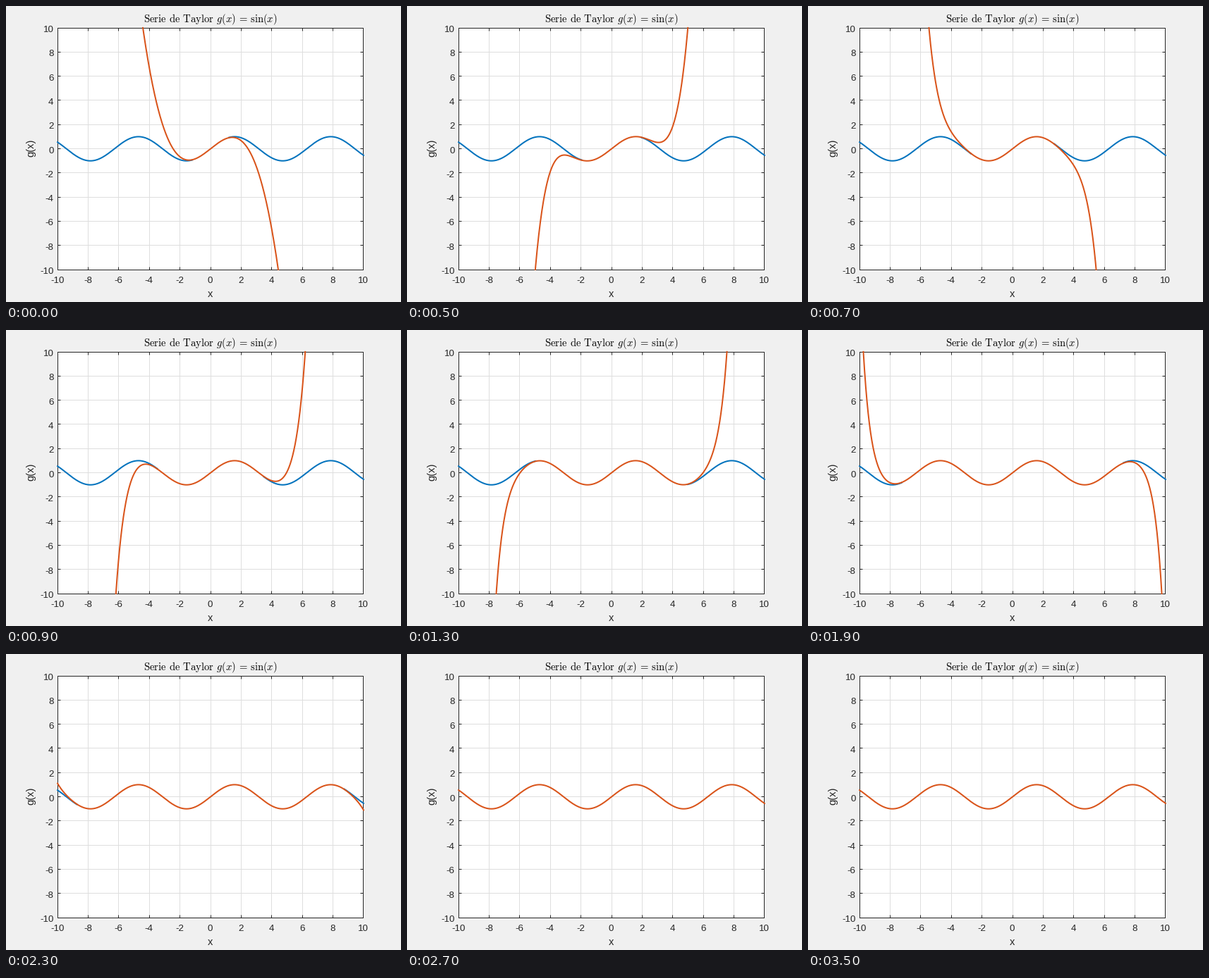
A matplotlib script for the animation above (4300 ms loop, 560 by 420 pixels).

```python
from math import factorial

import numpy as np
import matplotlib.pyplot as plt
from matplotlib.animation import FuncAnimation
from matplotlib.transforms import Bbox, ScaledTranslation, TransformedBbox

W, H, DPI = 560, 420, 80
PX = 72 / DPI  # one pixel in points
INTERVAL, LOOP = 100, 4300
HOLD, STEP, LAST = 500, 200, 16
INK, GRID, BLUE, ORANGE = "#262626", "#dedede", "#0072bd", "#d95319"
LEFT, BOTTOM, WIDTH, HEIGHT = 72.6, 46.45, 433.85, 343

plt.rcParams["font.family"] = "Liberation Sans"
plt.rcParams["mathtext.fontset"] = "cm"

fig = plt.figure(figsize=(W / DPI, H / DPI), dpi=DPI, facecolor="#f0f0f0")
ax = fig.add_axes([LEFT / W, BOTTOM / H, WIDTH / W, HEIGHT / H])


def label(x, y, text, size, **kw):
    """Place text by pixel position of its baseline, y measured downwards."""
    opts = dict(ha="center", va="baseline", color=INK) | kw
    fig.text(x / W, 1 - y / H, text, fontsize=size * PX, **opts)


def taylor_sin(x, terms):
    return sum((-1) ** k * x ** (2 * k + 1) / factorial(2 * k + 1)
               for k in range(terms))


# Axes frame, ticks and grid
ticks = np.arange(-10, 11, 2)
ax.set(xlim=(-10, 10), ylim=(-10, 10), xticks=ticks, yticks=ticks)
ax.set_axisbelow(True)
ax.grid(color=GRID, linewidth=PX)
ax.tick_params(direction="in", length=4 * PX, width=PX, color=INK,
               top=True, right=True, labelbottom=False, labelleft=False)
for spine in ax.spines.values():
    spine.set(color=INK, linewidth=PX, zorder=1)

for v in ticks:
    part = (v + 10) / 20
    label(LEFT + WIDTH * part, 393, str(v), 13.33)
    label(67.5, H - BOTTOM - HEIGHT * part + 6.5, str(v), 13.33, ha="right")
label(290, 413, "x", 14.67)
label(39, 201, "g(x)", 14.67, rotation=90, rotation_mode="anchor")
words = "Serie de Taylor ".replace(" ", r"\hspace{0.4}")
label(290, 23, rf"$\mathrm{{{words}}}g(x)\,=\,\sin(x)$", 14.67, color="black")

# Curves run through pixel centres and may overlap the frame by a pixel
x = np.linspace(-10, 10, 1001)
sine = np.sin(x)
clip = TransformedBbox(
    Bbox.from_extents(72 / W, 45 / H, 508 / W, 390 / H), fig.transFigure)
shift = ax.transData + ScaledTranslation(0.5 / DPI, -0.5 / DPI,
                                         fig.dpi_scale_trans)


def curve(color):
    line, = ax.plot(x, sine, color=color, linewidth=2 * PX, zorder=3,
                    transform=shift)
    line.set_clip_path(None)
    line.set_clip_box(clip)
    return line


exact, approx = curve(BLUE), curve(ORANGE)
ax.set(xlim=(-10, 10), ylim=(-10, 10))


def update(i):
    t = i * INTERVAL
    step = 0 if t < HOLD else min(LAST, 1 + (t - HOLD) // STEP)
    y = taylor_sin(x, 2 + step)
    approx.set_ydata(y)
    # Leave out the covered part so no blue fringe shows through
    exact.set_ydata(np.where(abs(y - sine) < 0.02, np.nan, sine))
    return exact, approx


anim = FuncAnimation(fig, update, frames=LOOP // INTERVAL, interval=INTERVAL,
                     repeat=True, repeat_delay=0)
plt.show()
```
